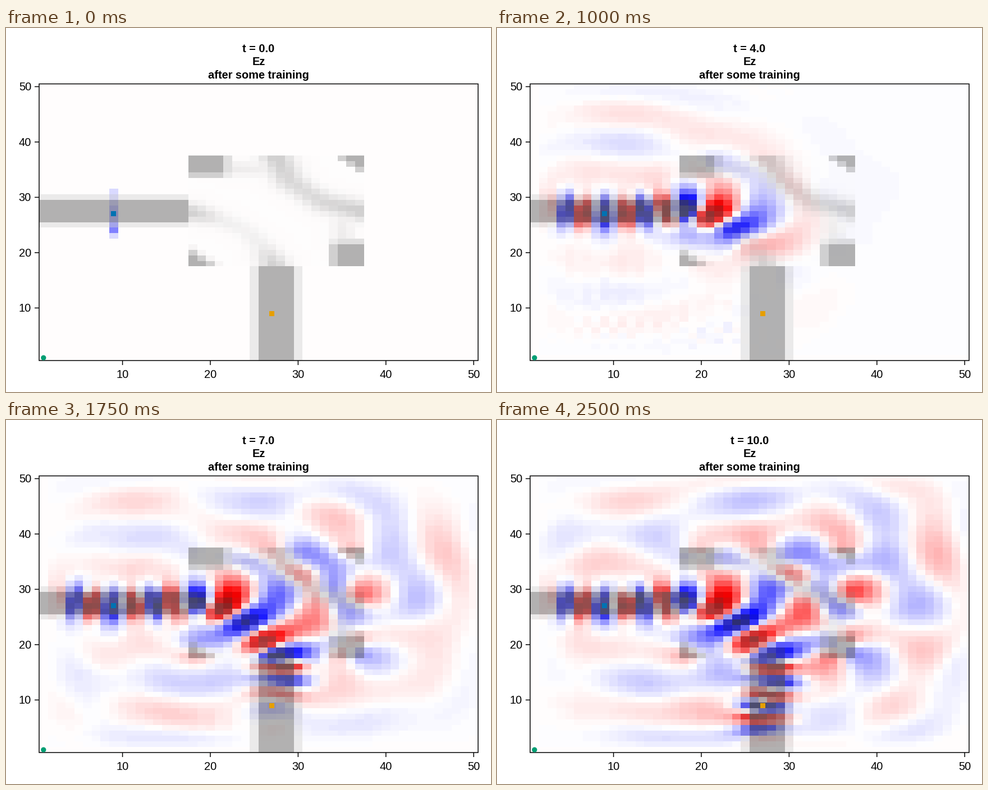
A matplotlib script that plays this animation: 864 px wide and 648 px high, repeating every 2.56 s.

```python
import numpy as np
import matplotlib.pyplot as plt
from matplotlib.animation import FuncAnimation
from matplotlib.patches import Circle, Rectangle

W, H, DPI = 864, 648, 100
LEFT, RIGHT, TOP, BOTTOM = 59, 841, 99.5, 592
N, STEPS, LOOP = 50, 41, 2560

# wave solver: lengths in cells, vacuum light speed 1
WAVELENGTH, DT = 16, 0.5
PER_PERIOD = int(WAVELENGTH / DT)
PER_FRAME = PER_PERIOD // 4
EPS_CORE, EPS_CLAD = 3.48 ** 2, 1.44 ** 2
GUIDE_MID, GUIDE_HALF = 27.5, 2.5
SOURCE_X, SOURCE_Y = 9, 27
DRIVE = 4.8

plt.rcParams["font.family"] = "Liberation Sans"
# one hidden row and column lie beyond the top and right edges
X, Y = np.meshgrid(np.arange(1, N + 2), np.arange(1, N + 2))


def px(x):
    return LEFT + (x - 0.5) * (RIGHT - LEFT) / N


def py(y):
    return BOTTOM - (y - 0.5) * (BOTTOM - TOP) / N


def unit(a):
    return np.clip(a, 0, 1)


# ---- material ---------------------------------------------------------

def stroke(*nodes):
    """Soft line through nodes of (x, y, darkness, width)."""
    at = np.linspace(0, len(nodes) - 1, 40)
    cols = [np.interp(at, range(len(nodes)), c) for c in zip(*nodes)]
    return np.max([a * np.exp(-((X - x) ** 2 + (Y - y) ** 2) / (2 * s * s))
                   for x, y, a, s in zip(*cols)], axis=0)


def make_density():
    """Share of core material per cell, mirrored about the diagonal."""
    shade = np.maximum.reduce([
        stroke((27.4, 37.5, .65, 1.2), (29, 33, .5, 1.2), (30.9, 30.9, .45, 1.1)),
        stroke((21, 35.2, .25, .9), (26, 35, .18, .9)),
        stroke((18, 27.2, .58, 1.1), (21, 26, .2, 1), (24, 24, .14, 1)),
        unit(22.4 - X) * unit(Y - 33.4),
        unit(.6 + .5 * (38 - X - Y)),
        unit(.6 + .6 * (X + Y - 72)),
    ])
    shade[(X < 18) | (X > 37) | (Y < 18) | (Y > 37)] = 0
    density = np.sqrt(shade)
    guide = unit(GUIDE_HALF + .5 - abs(Y - GUIDE_MID)) * (X < 18)
    density = np.maximum(density, guide)
    return np.maximum(density, density.T)


DENSITY = make_density()


# ---- field ------------------------------------------------------------

def mode_source():
    """Profile of the lowest guide mode on one short column."""
    kappa, gamma = 0.473, 1.15
    d = abs(Y - SOURCE_Y)
    tail = np.cos(kappa * GUIDE_HALF) * np.exp(-gamma * (d - GUIDE_HALF))
    profile = np.where(d < GUIDE_HALF, np.cos(kappa * d), tail)
    return DRIVE * profile * (X == SOURCE_X) * (d <= 4)


def absorber(depth=5, strength=0.55):
    edge = np.minimum(np.arange(N + 1), np.arange(N + 1)[::-1])
    loss = strength * unit(1 - edge / depth) ** 2
    return np.exp(-DT * (loss[:, None] + loss[None, :]))


def simulate():
    eps = EPS_CLAD + (EPS_CORE - EPS_CLAD) * DENSITY
    source, fade = mode_source(), absorber()
    inner = (slice(1, -1), slice(1, -1))
    ez = np.zeros_like(eps)
    hx, hy = np.zeros((N, N + 1)), np.zeros((N + 1, N))
    frames = []
    for n in range((STEPS - 1) * PER_FRAME + 1):
        hx = (hx - DT * np.diff(ez, axis=0)) * fade[:-1]
        hy = (hy + DT * np.diff(ez, axis=1)) * fade[:, :-1]
        curl = np.diff(hy, axis=1)[1:-1] - np.diff(hx, axis=0)[:, 1:-1]
        current = source[inner] * np.cos(2 * np.pi * n / PER_PERIOD)
        ez[inner] += DT / eps[inner] * (curl - current)
        ez *= fade
        if n % PER_FRAME == 0:
            frames.append(ez[:N, :N].copy())
    return frames


FIELD = simulate()
SEISMIC = plt.get_cmap("seismic")
DENSE = DENSITY[:N, :N, None]
ALPHA, GRAY = 0.6 * DENSE, 1 - 0.5 * DENSE


def render(i):
    rgb = SEISMIC((FIELD[i] + 1) / 2)[..., :3]
    return rgb * (1 - ALPHA) + GRAY * ALPHA


# ---- stage ------------------------------------------------------------

fig = plt.figure(figsize=(W / DPI, H / DPI), dpi=DPI, facecolor="white")
ax = fig.add_axes([0, 0, 1, 1])
ax.axis("off")
image = ax.imshow(render(0), extent=(LEFT, RIGHT, BOTTOM, TOP), origin="lower",
                  interpolation="nearest", aspect="auto")
ax.set_xlim(0, W)
ax.set_ylim(H, 0)

SIZE = 20 * 72 / DPI
THIN = 1.5 * 72 / DPI


def label(x, y, text, **kw):
    return ax.text(x, y, text, fontsize=SIZE, va="baseline", **kw)


def tick(xs, ys):
    ax.plot(xs, ys, color="black", lw=THIN, solid_capstyle="butt", snap=False)


for n in range(10, N + 1, 10):
    tick([px(n)] * 2, [BOTTOM, BOTTOM + 8])
    tick([LEFT - 8, LEFT], [py(n)] * 2)
    label(px(n), 623, str(n), ha="center")
    label(45, py(n) + 7, str(n), ha="right")

ax.add_patch(Rectangle((LEFT, TOP), RIGHT - LEFT, BOTTOM - TOP, fill=False,
                       ec="black", lw=THIN, zorder=3, snap=False))
for x, y, color in ((SOURCE_X, SOURCE_Y, "#0072B2"), (27, 9, "#E69F00")):
    ax.add_patch(Rectangle((px(x) - 4.5, py(y) - 4.5), 9, 9, fc=color, lw=0, zorder=4))
ax.add_patch(Circle((px(1), py(1)), 4.6, fc="#009E73", lw=0, zorder=4))

MID = (LEFT + RIGHT) / 2
clock, *_ = [label(MID, y, text, ha="center", weight="bold") for y, text in
             ((43, ""), (66, "Ez"), (90, "after some training"))]


def draw(i):
    image.set_data(render(i))
    clock.set_text(f"t = {i / 4}")
    return image, clock


anim = FuncAnimation(fig, draw, frames=STEPS, interval=LOOP / STEPS, repeat=True)
plt.show()
```
